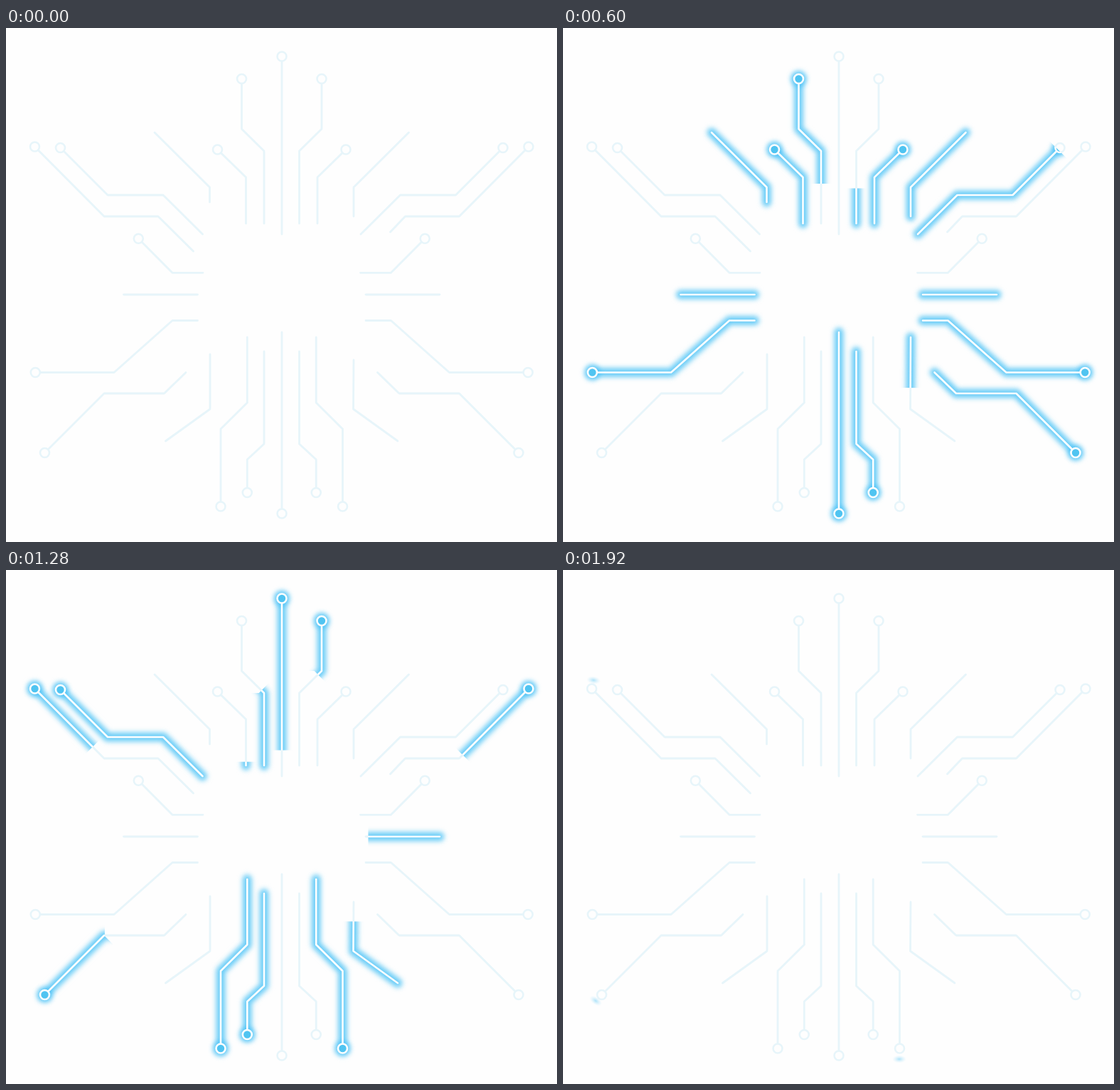
An HTML page with a canvas for the animation above (2320 ms loop, 775 by 723 pixels).

```html
<!DOCTYPE html>
<html lang="en">
<head>
<meta charset="utf-8">
<title>Circuit traces</title>
<style>
html, body { margin: 0; width: 100%; height: 100%; overflow: hidden; background: #fefefe; }
canvas { display: block; }
</style>
</head>
<body>
<canvas id="stage" width="775" height="723"></canvas>
<script>
const W = 775, H = 723, LOOP = 2320, STEP = 40, RING = 6.5, PAD = 16;
const BACK = '#fefefe', DIM = '#e7f5fa';

// Left half, each trace from its inner end to its outer end; the right half mirrors it.
const shapes = {
  top: [[363, 275], [363, 173], [331.5, 142], [331.5, 71.5]],
  topShort: [[337.5, 275], [337.5, 210], [297.5, 171]],
  topOpen: [[286.5, 245], [286.5, 224], [209, 147]],
  wing: [[276.5, 290], [221, 235], [143, 235], [76.5, 168.5]],
  wingLow: [[263.5, 314], [214, 265], [138, 265], [40.5, 167]],
  sideShort: [[277, 344.3], [234, 344.3], [186.3, 296.3]],
  sideOpen: [[269.5, 375], [165.5, 375]],
  side: [[269.5, 411.5], [234, 411.5], [152, 484.5], [41.3, 484.5]],
  foot: [[253, 484.5], [222.5, 514], [138, 514], [54.5, 597.5]],
  footOpen: [[287, 459], [287, 536], [224.5, 581]],
  root: [[339.3, 435], [339.3, 527], [302, 564], [302, 673]],
  rootShort: [[363, 455], [363, 585], [339.3, 607], [339.3, 653.5]],
  north: [[388, 290], [388, 40]],
  south: [[388, 428], [388, 683]]
};
// Right-hand traces whose inner end is not the mirror image
const innerRight = { topOpen: [489, 265], wingLow: [540.5, 287], footOpen: [489, 435] };

// shape, side, direction of travel, time of lighting, time of fading
const timing = [
  ['top', 'L', 'in', 420, 1155], ['top', 'R', 'out', 547, 1131],
  ['topShort', 'L', 'in', 300, 1050], ['topShort', 'R', 'in', 330, 980],
  ['topOpen', 'L', 'in', 95, 780], ['topOpen', 'R', 'in', 400, 640],
  ['wing', 'L', 'out', 685, 1300], ['wing', 'R', 'in', 95, 590],
  ['wingLow', 'L', 'out', 635, 1141], ['wingLow', 'R', 'out', 600, 1172],
  ['sideShort', 'L', 'out', 1320, 1680], ['sideShort', 'R', 'out', 696, 1000],
  ['sideOpen', 'L', 'in', 95, 950], ['sideOpen', 'R', 'out', 400, 1276],
  ['side', 'L', 'in', 91, 682], ['side', 'R', 'in', 195, 900],
  ['foot', 'L', 'out', 674, 1160], ['foot', 'R', 'in', 95, 600],
  ['footOpen', 'L', 'out', 660, 1040], ['footOpen', 'R', 'out', 552, 1240],
  ['root', 'L', 'out', 665, 1430], ['root', 'R', 'out', 754, 1485],
  ['rootShort', 'L', 'out', 821, 1520], ['rootShort', 'R', 'in', 95, 660],
  ['north', 'L', 'out', 667, 1246], ['south', 'L', 'in', 195, 890]
];
// Faint spots that linger: x, y, tilt, time
const spots = [[43, 155, .15, 1381], [46, 606, .6, 1400], [473, 688, 0, 1725]];

const layer = () => Object.assign(document.createElement('canvas'), { width: W, height: H }).getContext('2d');
const dist = (a, b) => Math.hypot(b[0] - a[0], b[1] - a[1]);
const clamp = v => Math.max(0, Math.min(1, v));

function line(c, pts, width, color) {
  c.beginPath();
  pts.forEach(p => c.lineTo(...p));
  c.lineWidth = width;
  c.strokeStyle = color;
  c.stroke();
}

function disc(c, p, r, color) {
  c.beginPath();
  c.arc(...p, r, 0, 2 * Math.PI);
  c.fillStyle = color;
  c.fill();
}

function drawTrace(c, tr, pts, width, color, fill) {
  c.lineJoin = c.lineCap = 'round';
  line(c, pts, width, color);
  if (tr.open) return;
  disc(c, tr.tip, RING, fill);
  c.lineWidth = 2.6;
  c.stroke();
}

// Point lying PAD beyond a, away from b
function beyond(a, b) {
  const k = PAD / dist(a, b);
  return [a[0] + (a[0] - b[0]) * k, a[1] + (a[1] - b[1]) * k];
}

function makeTrace([name, side, dir, on, off]) {
  let pts = shapes[name];
  if (side === 'R') {
    pts = pts.map(([x, y]) => [775.5 - x, y]);
    if (innerRight[name]) pts[0] = innerRight[name];
  }
  const n = pts.length, open = name.endsWith('Open');
  const tr = { pts, open, dir, on, off, tip: pts[n - 1], time: open ? 120 : 240 };
  tr.length = pts.slice(1).reduce((sum, p, i) => sum + dist(pts[i], p), open ? 0 : 7);
  let end = beyond(pts[n - 1], pts[n - 2]);
  if (!open) end = beyond(end, pts[n - 2]);
  tr.wipe = [beyond(pts[0], pts[1]), ...pts, end];

  const c = layer();
  c.lineJoin = c.lineCap = 'round';
  for (const [width, r, blur, color] of [
    [18, 13, 3, 'rgba(150,220,245,.28)'],
    [11, 10.5, 3, 'rgba(70,192,247,.78)']
  ]) {
    c.filter = `blur(${blur}px)`;
    line(c, pts, width, color);
    if (!open) disc(c, tr.tip, r, color);
  }
  c.filter = 'none';
  drawTrace(c, tr, pts, 2.6, '#fff', '#50c4f1');
  tr.lit = c.canvas;
  return tr;
}

const traces = timing.map(makeTrace);
const base = layer();
base.fillStyle = BACK;
base.fillRect(0, 0, W, H);
for (const tr of traces) {
  const pts = tr.pts.slice();
  if (pts[0] === innerRight.footOpen) pts[0] = [489, 467];
  drawTrace(base, tr, pts, 2.8, DIM, BACK);
}

const ctx = document.getElementById('stage').getContext('2d');
const scratch = layer();
scratch.lineJoin = 'round';

function drawLit(tr, t) {
  const head = clamp((t - tr.on) / tr.time), tail = clamp((t - tr.off) / tr.time);
  if (head <= tail) return;
  const [a, b] = tr.dir === 'out' ? [tail, head] : [1 - head, 1 - tail];
  const from = a > 0 ? a * tr.length + PAD : 0;
  const to = b < 1 ? b * tr.length + PAD : tr.length + 3 * PAD;
  scratch.globalCompositeOperation = 'source-over';
  scratch.clearRect(0, 0, W, H);
  scratch.setLineDash([to - from, 2000]);
  scratch.lineDashOffset = -from;
  line(scratch, tr.wipe, 36, '#000');
  scratch.globalCompositeOperation = 'source-in';
  scratch.drawImage(tr.lit, 0, 0);
  ctx.drawImage(scratch.canvas, 0, 0);
}

function drawSpot([x, y, tilt]) {
  const g = ctx.createRadialGradient(0, 0, 0, 0, 0, 10);
  g.addColorStop(0, 'rgba(120,208,246,.6)');
  g.addColorStop(1, 'rgba(190,232,250,0)');
  ctx.save();
  ctx.translate(x, y);
  ctx.rotate(tilt);
  ctx.scale(1, .55);
  disc(ctx, [0, 0], 10, g);
  ctx.restore();
}

const start = performance.now();
let shown = -1;
function tick() {
  const t = Math.floor((performance.now() - start) % LOOP / STEP) * STEP;
  if (t !== shown) {
    shown = t;
    ctx.drawImage(base.canvas, 0, 0);
    spots.filter(s => t >= s[3]).forEach(drawSpot);
    traces.forEach(tr => drawLit(tr, t));
  }
  requestAnimationFrame(tick);
}
tick();
</script>
</body>
</html>
```
